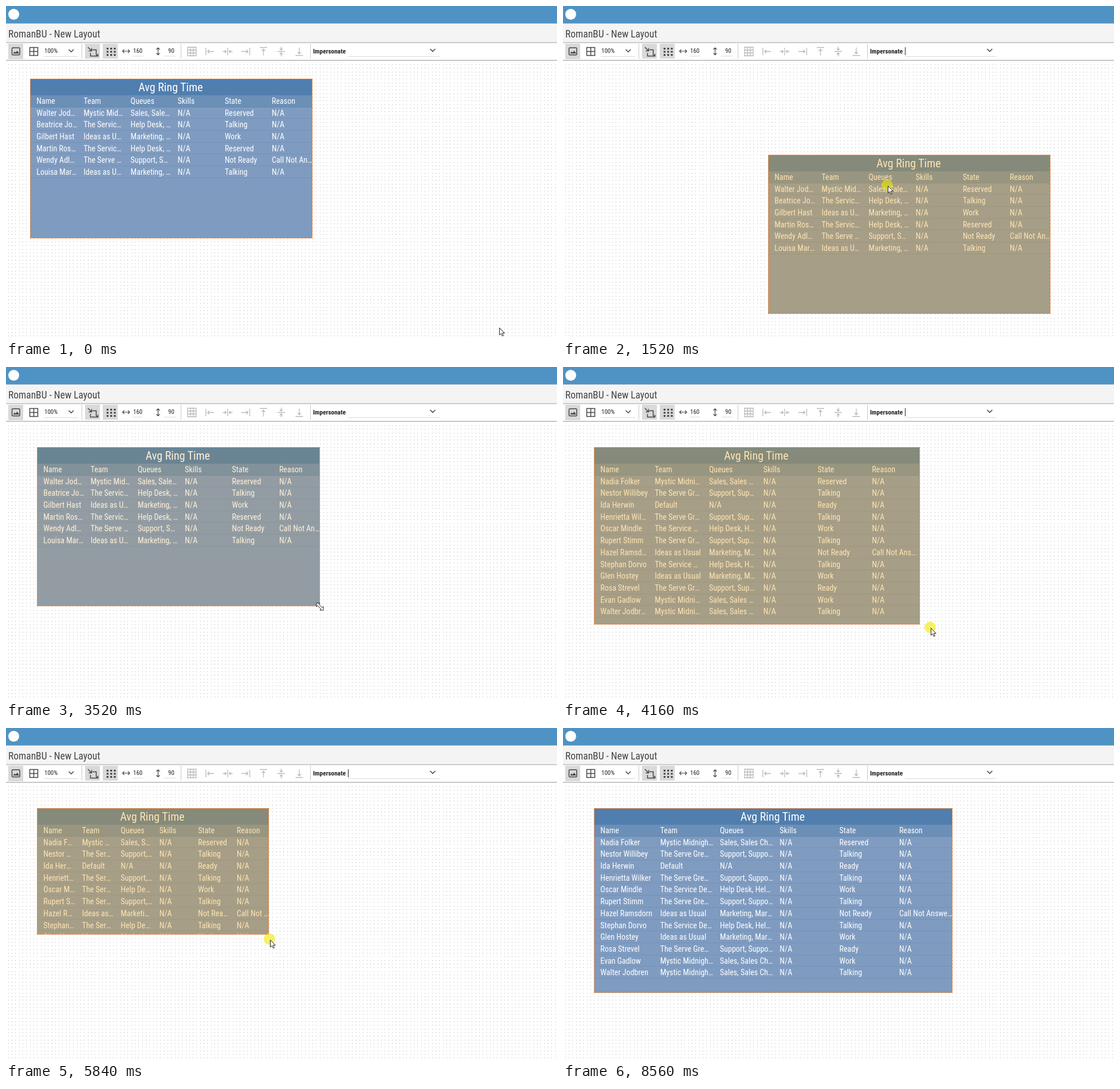
These frames come from a looping animation (962 px wide and 582 px high, 8720 ms). An HTML page with a canvas:

```html
<!DOCTYPE html>
<html lang="en">
<head>
<meta charset="utf-8">
<title>Layout editor</title>
<style>
html, body { margin: 0; width: 100%; height: 100%; overflow: hidden; background: #fff; }
body { font-family: "Roboto Condensed", Roboto, sans-serif; font-stretch: 75%; }
#stage { position: absolute; left: 0; top: 0; width: 962px; height: 582px; overflow: hidden; }
#stage > * { position: absolute; }
#dots, #icons, #mouse { left: 0; top: 0; }
#top { left: 0; top: 0; width: 962px; height: 30px; background: #4f93c4; border-bottom: 1px solid #a9bccb; }
#logo { left: 4px; top: 5px; width: 19px; height: 19px; border-radius: 50%; background: #fff; }
#head { left: 0; top: 31px; width: 958px; height: 32px; padding-left: 4px; background: #f4f4f4;
  border-bottom: 2px solid #cbcbcb; font-size: 17.5px; line-height: 36px; color: #444; }
#tools { left: 0; top: 65px; width: 962px; height: 29px; background: #fff; border-bottom: 2px solid #c6c6c6; }
.label { font-size: 11px; line-height: 14px; top: 72px; color: #222; white-space: nowrap; }
#caret { left: 597px; top: 72px; width: 1px; height: 14px; background: #222; }
#panel { overflow: hidden; background: #7f9bc0; color: #fff; }
#name { height: 29px; line-height: 30px; padding-right: 2px; font-size: 20px; text-align: center;
  background: #507eae; white-space: nowrap; }
.row { display: flex; height: 20.7px; line-height: 20.7px; font-size: 14px; box-shadow: inset 0 -1px rgba(70,105,150,.2); }
.row.th { background: #6b8fb7; }
.row span { flex: 0 0 calc(100% / 6); box-sizing: border-box; padding-left: 11.3px;
  overflow: hidden; text-overflow: ellipsis; white-space: nowrap; }
#tint, #edge { position: absolute; inset: 0; }
#tint { background: rgba(255,165,0,.3); }
#edge { border: 1px solid #e3894e; }
#mouse { overflow: visible; }
</style>
</head>
<body>
<div id="stage">
  <canvas id="dots" width="962" height="582"></canvas>
  <div id="top"></div><div id="logo"></div>
  <div id="head">RomanBU - New Layout</div>
  <div id="tools"></div>
  <svg id="icons" width="962" height="96" fill="none" stroke="#444" stroke-width="1.5">
    <path fill="#d9d9d9" stroke="none" d="M4 66h26v27H4zM138 66h26v26h-26zM169 66h26v26h-26z"/>
    <path stroke="#c9c9c9" stroke-width="1" d="M132.5 66v26M305.5 66v26M531.5 66v26"/>
    <path stroke="#dadada" stroke-width="1" d="M66 88.5h60M221 87.5h18M276 87.5h20M597 88.5h160"/>
    <rect x="10.5" y="73" width="13.5" height="12.5" rx="1.5"/>
    <path fill="#444" stroke="none" d="M12.5 83l2.5-3.5 2 2 2.5-3.5 3.5 5z"/>
    <path d="M41.5 72.5h14v14h-14zM48.5 72.5v14M41.5 79.5h14"/>
    <path d="M109.5 76l4.3 4.3 4.3-4.3M740.5 75l4.5 4.5 4.5-4.5"/>
    <path d="M143 72l6 6M149.5 73.5v5h-5M147.5 82v5.500h9M151 76.5h6.5v8M157 84l3 4M155 87.5h5.5v-4"/>
    <path stroke-width="3.2" stroke-dasharray="3.2 3.1" d="M175.7 74.5h16M175.7 80h16M175.7 85.5h16"/>
    <path stroke-width="1.2" d="M203.5 79h12.5M206.5 76l-3 3 3 3M213 76l3 3-3 3M265.5 73v12.5M262.5 76l3-3 3 3M262.5 82.5l3 3 3-3"/>
    <g stroke="#b9b9b9" stroke-width="1.3">
      <path d="M317 72h15v15h-15zM322 72v15M327 72v15M317 77h15M317 82h15"/>
      <path d="M349 73v13M352 79.5h11M355 76.5l-3 3 3 3"/>
      <path d="M387 73v13M378.5 79.5h6M382 77l2.5 2.5-2.5 2.5M395.5 79.5h-6M392 77l-2.5 2.5 2.5 2.5"/>
      <path d="M425.5 73v13M411 79.5h11.5M419.5 76.5l3 3-3 3"/>
      <path d="M443 72.5h13M449.5 75.5v11M446.5 78.5l3-3 3 3"/>
      <path d="M474 79.5h13M480.5 71v6M478 74.5l2.5 2.5 2.5-2.5M480.5 88v-6M478 84.5l2.5-2.5 2.5 2.5"/>
      <path d="M505.5 86.5h13M512 72.5v11M509 80.5l3 3 3-3"/>
    </g>
  </svg>
  <div class="label" style="left:67px">100%</div>
  <div class="label" style="left:222px">160</div>
  <div class="label" style="left:283px">90</div>
  <b class="label" style="left:536px;font-size:11.4px">Impersonate</b>
  <div id="caret"></div>
  <div id="panel">
    <div id="name">Avg Ring Time</div>
    <div id="columns"></div>
    <div id="pageA"></div>
    <div id="pageB"></div>
    <div id="tint"></div>
    <div id="edge"></div>
  </div>
  <svg id="mouse" width="1" height="1">
    <circle id="press" cx="-1" cy="-1" r="10" fill="rgba(238,234,0,.6)"/>
    <path id="arrow" fill="#fff" stroke="#222" d="M.5 .5v12.5l3-2.7 2 4.6 2-.9-2-4.4h3.8z"/>
    <path id="sizer" fill="#fff" stroke="#222" d="M-6 -6.5h6l-2 2 6 6 2-2v6.5h-6l2-2-6-6-2 2z"/>
  </svg>
</div>
<script>
const LOOP = 8720, TICK = 40;
const CELL = 6.325, X0 = 4.1, Y0 = 96.2;
const LEAD = 36;              // the panel trails the pointer by this many ms
const DRAG = 900, DROP = 2106, RESIZE = 3900;
const $ = id => document.getElementById(id);

// Team code -> team name and queues
const TEAMS = {
  M: ["Mystic Midnights", "Sales, Sales Chat"],
  G: ["The Serve Gremlins", "Support, Support Chat"],
  D: ["The Service Demons", "Help Desk, Help Desk Chat"],
  I: ["Ideas as Usual", "Marketing, Marketing Chat"],
  N: ["Default", "N/A"]
};
const STATES = { v: "Reserved", t: "Talking", w: "Work", r: "Ready", n: "Not Ready" };

const PAGE_A = `Nadia Folker/Mv, Nestor Willibey/Gt, Ida Herwin/Nr, Henrietta Wilker/Gt,
  Oscar Mindle/Dw, Rupert Stimm/Gt, Hazel Ramsdorn/In, Stephan Dorvo/Dt,
  Glen Hostey/Iw, Rosa Strevel/Gr, Evan Gadlow/Mw, Walter Jodbren/Mt`;
const PAGE_B = `Walter Jodbren/Mv, Beatrice Jolland/Dt, Gilbert Hast/Iw, Martin Rosendale/Dv,
  Wendy Adlestone/Gn, Louisa Marbrook/It`;

const within = (t, a, b) => t >= a && t < b;
const show = (el, on) => { el.style.display = on ? "" : "none"; };
const ramp = (t, a, b) => Math.min(1, Math.max(0, (t - a) / (b - a)));
const ease = (t, a, b) => { const u = ramp(t, a, b); return u * u * (3 - 2 * u); };
const mix = (a, b, k) => a.map((v, i) => v + (b[i] - v) * k);
const swing = (t, mid, amp, peak, period) => mid + amp * Math.cos(2 * Math.PI * (t - peak) / period);

// Panel place in grid cells: one wide loop across the canvas
function place(t) {
  if (t < DRAG) return [6, 5];
  if (t >= DROP) return [8, 7];
  const p = ramp(t, DRAG, DROP);
  return [swing(t, 31, 27, 1597, 1236), 5 + 2 * p + 26.7 * Math.sin(Math.PI * p ** .6) ** 2];
}

// Panel size in grid cells: both sides swing, out of step
function size(t) {
  const w = swing(Math.min(t, 7000), 81, 18, 4440, 2560);
  const h = swing(Math.min(t, 6600), 37.14, 14.35, 6500, 2400);
  return mix([78, 44], [w, h], ease(t, RESIZE, RESIZE + 400));
}

const toPx = ([x, y]) => [X0 + x * CELL, Y0 + y * CELL];
const sum = (a, b) => a.map((v, i) => v + b[i]);
const grip = t => sum(toPx(place(t)), [200, 66]);
const corner = t => toPx(sum(place(t), size(t)));

function pointer(t) {
  if (t < DRAG - LEAD) return mix([861, 562], grip(0), ease(t, 80, 760));
  if (t < 7320) return mix(grip(t + LEAD), corner(t + LEAD), ease(t, 2680, 3080));
  return mix(corner(t), [905, 600], ease(t, 7320, 7960));
}

// Steady while the mouse works, blinking after each release
function caretOn(t) {
  if (t < 2600) return t >= 700;
  if (within(t, 3920, 7680)) return true;
  return (t - (t < 3920 ? 2600 : 7680)) % 880 >= 440;
}

function addRow(box, cells, cls = "") {
  const row = document.createElement("div");
  row.className = "row " + cls;
  for (const text of cells) row.appendChild(document.createElement("span")).textContent = text;
  box.appendChild(row);
}

function addPage(box, list) {
  for (const item of list.split(",")) {
    const [name, [team, state]] = item.trim().split("/");
    addRow(box, [name, ...TEAMS[team], "N/A", STATES[state], state === "n" ? "Call Not Answered" : "N/A"]);
  }
}

function drawDots() {
  const g = $("dots").getContext("2d");
  g.fillStyle = "#adadad";
  for (let y = Y0 + CELL; y < 582; y += CELL)
    for (let x = X0; x < 962; x += CELL) g.fillRect(Math.floor(x), Math.floor(y), 1, 1);
}

function placePanel(t) {
  const spot = place(t).map(Math.round);
  const [x, y] = toPx(spot).map(Math.floor);
  const [r, b] = toPx(sum(spot, size(t).map(Math.round))).map(Math.floor);
  const s = $("panel").style;
  s.left = x + "px";
  s.top = y + "px";
  s.width = r - x + "px";
  s.height = b - y + "px";
}

function render(t) {
  placePanel(t);
  $("tint").style.opacity = ramp(t, 760, 920) - ramp(t, 2680, 2880) + ramp(t, 3440, 3600) - ramp(t, 7240, 7440);
  show($("pageA"), t >= RESIZE);
  show($("pageB"), t < RESIZE);
  show($("caret"), caretOn(t));
  const sizing = within(t, 3040, RESIZE) || within(t, 7240, 7400);
  show($("press"), within(t, 760, 2640) || within(t, RESIZE, 7240));
  show($("arrow"), !sizing);
  show($("sizer"), sizing);
  show($("mouse"), t < 7960);
  const [x, y] = pointer(t).map(Math.round);
  $("mouse").style.transform = `translate(${x}px, ${y}px)`;
}

addRow($("columns"), ["Name", "Team", "Queues", "Skills", "State", "Reason"], "th");
addPage($("pageA"), PAGE_A);
addPage($("pageB"), PAGE_B);
drawDots();

const start = performance.now();
function frame() {
  const t = (performance.now() - start) % LOOP;
  render(t - t % TICK);
  requestAnimationFrame(frame);
}
render(0);
requestAnimationFrame(frame);
</script>
</body>
</html>
```
